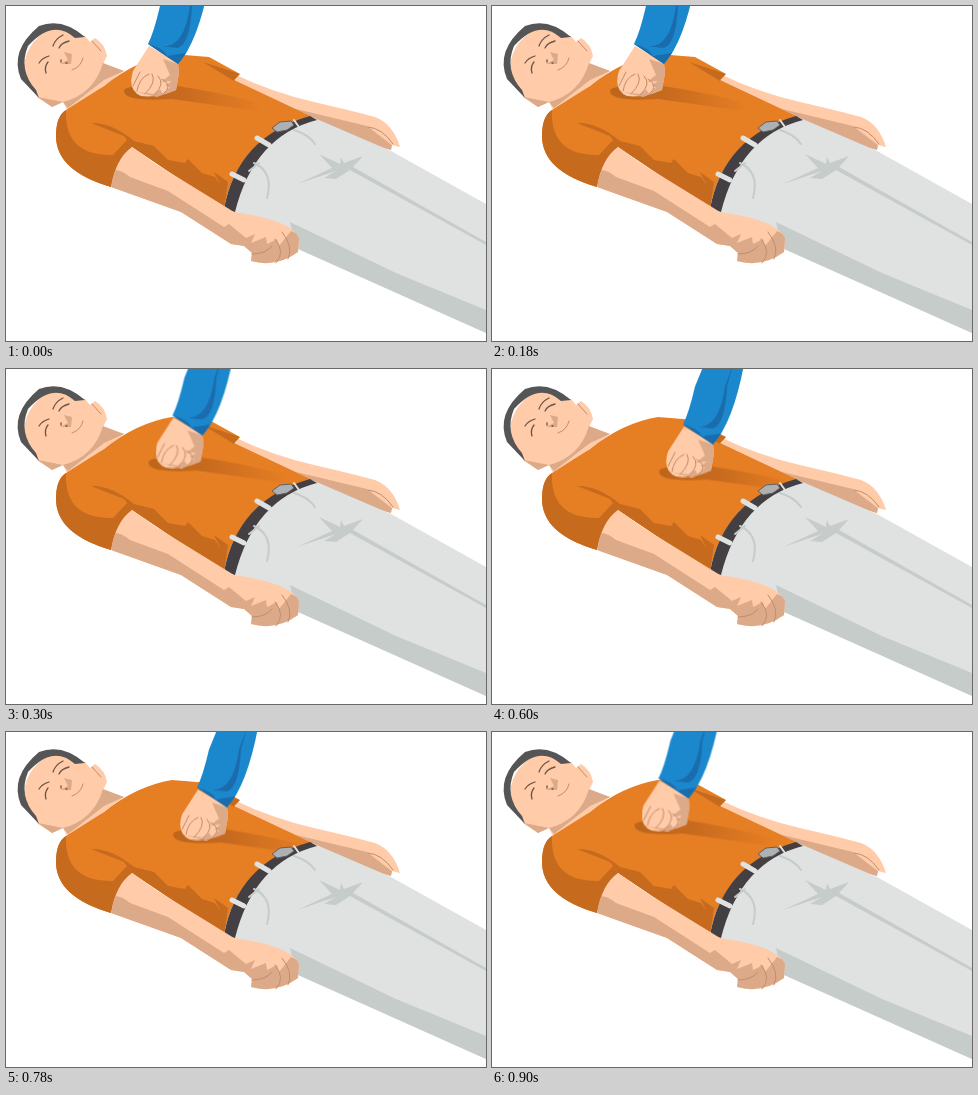
Write an HTML page that moves like this. It is 480 px wide and 335 px high and loops after 1.2 s.

```html
<!DOCTYPE html>
<html lang="en">
<head>
<meta charset="utf-8">
<title>Chest compression position</title>
<style>
  html, body { margin: 0; width: 100%; height: 100%; overflow: hidden; background: #fff; }
  svg { display: block; width: 480px; height: 335px; }
  .skin { fill: #ffcba8; }
  .tan { fill: #dcaa88; }
  .shirt { fill: #e67e24; }
  .rust { fill: #c66a1e; }
  .cloth { fill: #dfe2e1; }
  .grey { fill: #c6ccca; }
  .blue { fill: #1b87cd; }
  .navy { fill: #1a6cac; }
  .line { fill: none; stroke-linecap: round; }
  .crease { stroke: #c08e6d; }
  .lash { stroke: #6b5448; stroke-width: 1.3; }
  .fold { stroke: #c6ccca; stroke-width: 2; }
  .loop { stroke: #dfe2e1; stroke-width: 5; }
  .move { animation: press 1.2s step-end infinite; }
  @keyframes press {
    0%, 100% { transform: none; }
    25%, 75% { transform: translate(24.5px, 8.5px); }
    50% { transform: translate(49px, 17.5px); }
  }
</style>
</head>
<body>
<svg>
  <defs>
    <linearGradient id="fade">
      <stop stop-color="#bd651c"/>
      <stop offset=".4" stop-color="#c66a1e"/>
      <stop offset="1" stop-color="#e67e24"/>
    </linearGradient>
    <path id="farArm" d="M228 68Q265 86 308 96T369 111Q387 118 394 141L386 139 385 144Q360 138 310 114L227 78Z"/>
    <path id="torso" d="M60 104 98 80Q130 54 166 48L203 51 234 68 228 74 306 111Q231 131 218 203L126 141 105 181Q50 165 50 130 50 110 60 104Z"/>
    <path id="nearArm" d="M126 141Q110 152 105 181L175 206 225 238 238 240 246 247 245 255Q270 262 292 246L293 232Q285 214 228 206L150 158Z"/>
    <clipPath id="inFar"><use href="#farArm"/></clipPath>
    <clipPath id="inTorso"><use href="#torso"/></clipPath>
    <clipPath id="inNear"><use href="#nearArm"/></clipPath>
  </defs>

  <!-- head -->
  <path class="skin" d="M18 68Q16 38 46 21L62 23 69 31 79 30 84 36 89 32Q99 38 101 50L97 58 118 65 62 106 57 96 46 101 32 92Z"/>
  <path class="tan" d="M97 57 118 65 98 74 62 102 57 96Q88 88 97 57ZM32 91 57 96 46 101Z"/>
  <path fill="#555556" d="M33 92 15 73Q3 45 33 20 56 11 79 31L69 32Q47 12 22 40 12 64 30 84Z"/>
  <path class="tan" d="M58 46 66 48 65 58 54 58 62 54Z"/>
  <path class="line lash" d="M33 57Q36 52 43 50M40 67Q38 61 42 56M47 40Q49 33 57 29M53 42Q55 37 63 35M55 54v2M60 57h1"/>
  <path class="line crease" d="M66 64Q75 61 77 52M86 35 95 45"/>

  <!-- far arm -->
  <use href="#farArm" class="skin"/>
  <path class="tan" clip-path="url(#inFar)" d="M229 75 290 103 361 120 387 140 385 145 310 116Z"/>
  <path class="line crease" d="M362 121Q376 122 387 138"/>

  <!-- shirt -->
  <use href="#torso" class="shirt"/>
  <g clip-path="url(#inTorso)">
    <path class="rust" d="M60 104Q58 150 107 149L121 134 126 141 105 181H45V100Z"/>
    <path class="rust" d="M85 117Q105 116 128 135L148 140 162 154 179 157 182 153 196 167 209 171 215 180 208 166 222 176 218 203 126 141 118 130Z"/>
    <path class="rust" d="M197 56 234 68 228 75Z"/>
    <path class="move" fill="url(#fade)" d="M118 85Q118 78 171 80 213 86 256 98L252 105 166 93Q118 96 118 85Z"/>
  </g>

  <!-- trousers and belt -->
  <path class="cloth" d="M306 111 385 145 480 198V327L292 243 218 203Q231 131 306 111Z"/>
  <path class="grey" d="M284 216 390 267 480 304V327L290 242Z"/>
  <path fill="#443f42" d="M218 203Q231 131 304 110L311 114Q248 130 229 206Z"/>
  <path class="line loop" d="M226 168 238 174M251 132 263 139"/>
  <path class="line loop" stroke-width="2" style="stroke-width:2" d="M288 114 293 121"/>
  <path fill="#aeb1b3" stroke="#625f62" d="M266 122 274 116 285 115 288 119 281 124 271 126Z"/>
  <path class="line fold" d="M248 157Q268 166 261 192M243 165 253 157M288 124Q302 128 309 138"/>
  <path class="grey" d="M313 148 334 158 335 151 338 157 357 150 347 161 480 236V239L344 164 330 173 318 172 330 165 291 178 326 162Z"/>

  <!-- near arm -->
  <use href="#nearArm" class="skin"/>
  <path class="tan" clip-path="url(#inNear)" d="M107 164Q115 163 124 171L162 185 218 221 223 218 240 232 249 228 245 237 260 231 261 238 271 233 273 240 285 225 300 232V262H230L105 185Z"/>
  <path class="line crease" d="M246 248Q260 248 266 240M270 257Q280 246 269 233M282 253Q288 241 276 226"/>

  <!-- rescuer's hand and sleeve -->
  <g class="move">
    <path class="skin" d="M143 40 127 65Q121 84 135 90 152 92 170 84L173 67 172 57Z"/>
    <path class="tan" d="M157 53 172 58 173 67 170 84 151 91 131 86 148 88 166 75 155 76 164 69Z"/>
    <path class="skin" d="M150 77 164 81 157 88Z"/>
    <path class="line crease" d="M134 66 127 80M143 68Q133 72 131 85M146 68Q151 76 139 88M152 70Q160 78 148 89M156 73Q168 80 157 88"/>
    <path class="blue" d="M163-22H203Q192 36 172 58L142 38Q148 26 154 0Z"/>
    <path class="navy" d="M142 38Q158 42 161 50L180 47 172 58ZM192-22 186 0Q184 38 172 42L154 40Q178 44 184 0Z"/>
  </g>
</svg>
</body>
</html>
```
